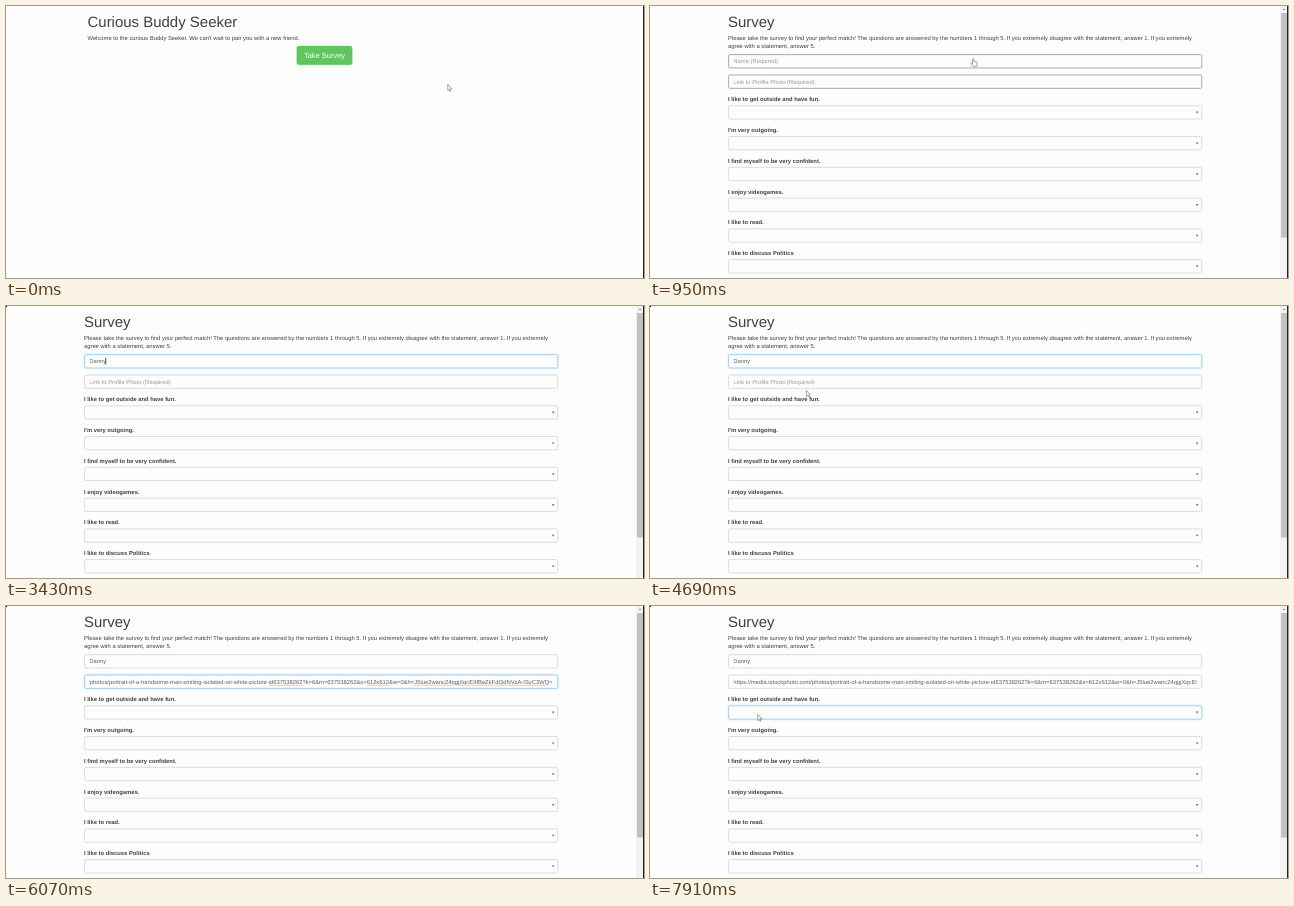
An HTML page for the animation above (8000 ms loop, 638 px wide and 272 px high).

```html
<!DOCTYPE html>
<html lang="en">
<head>
<meta charset="utf-8">
<title>Survey</title>
<style>
html, body { margin: 0; width: 100%; height: 100%; overflow: hidden; background: #fdfdfd; }
#view { position: absolute; left: 0; top: 0; width: 1532px; height: 656px; overflow: hidden;
  transform: scale(.4158); transform-origin: 0 0; text-rendering: geometricPrecision;
  font: 14px/20px Arial, "Liberation Sans", sans-serif; color: #404040; }
.page { position: absolute; top: -3.2px; width: 1140px; }
#home { left: 196px; }
#survey { left: 187.5px; }
h1 { font-size: 36px; font-weight: 500; line-height: 39.6px; margin: 21px 0 9px; }
p { margin: 0 0 10px; }
#btn { width: max-content; margin: 0 auto; padding: 10px 16px; border: 1px solid #5cbc5c; border-radius: 6px;
  font-size: 18px; line-height: 24px; color: #fff; background: #5fc65f; }
#btn.hover { background: #47a947; border-color: #398439; }
.label { font-weight: 700; margin-bottom: 5px; }
.field { position: relative; box-sizing: border-box; height: 34px; margin-bottom: 15px; padding: 5px 11px;
  border: 2px solid #d6d6d6; border-radius: 4px; background: #fdfdfd; color: #606060; }
.field.dark { border-color: #999; }
.field.focus { border-color: #94cbea; box-shadow: 0 0 6px rgba(102, 175, 233, .3); }
.clip { display: flex; height: 20px; overflow: hidden; white-space: nowrap; }
.clip.end { justify-content: flex-end; }
.clip > span { position: relative; flex: none; }
.hint { color: #999; }
.caret::after { content: ""; position: absolute; right: 0; top: 1px; width: 2px; height: 17px; background: #333; }
.hint.caret::after { right: auto; left: 0; }
.marked b { text-decoration: underline wavy #e55 1px; }
b.word { font-weight: 400; }
.select::after { content: ""; position: absolute; right: 7px; top: 13px;
  border: 3px solid transparent; border-top: 5px solid #666; border-bottom: 0; }
svg { position: absolute; left: 0; top: 0; }
</style>
</head>
<body>
<div id="view">
  <div class="page" id="home">
    <h1>Curious Buddy Seeker</h1>
    <p>Welcome to the curious Buddy Seeker. We can't wait to pair you with a new friend.</p>
    <div id="btn">Take Survey</div>
  </div>
  <div class="page" id="survey">
    <h1>Survey</h1>
    <p>Please take the survey to find your perfect match! The questions are answered by the numbers 1 through 5. If you extremely disagree with the statement, answer 1. If you extremely agree with a statement, answer 5.</p>
    <div class="field" id="name"><div class="clip"><span></span></div></div>
    <div class="field" id="link"><div class="clip"><span></span></div></div>
  </div>
</div>
<svg width="638" height="272" viewBox="0 0 638 272">
  <g id="bar">
    <path d="M630 0h7v272h-7z" fill="#f3f3f3"/>
    <path d="M631 7h6v224.5h-6z" fill="#c1c1c1"/>
    <path d="M632.500 4l1.500-1.500 1.500 1.500z" fill="#888"/>
  </g>
  <path d="M637 0h1v272h-1z" fill="#222"/>
  <path id="dot" d="M0 0h1v1H0z"/>
  <g id="cursor" stroke-width=".6" stroke="#666" fill="#fff">
    <path id="arrow" d="M.3.3v6.2l1.400-1.200.9 2 .9-.4-.9-2h1.700z"/>
    <path id="hand" d="M2 5V1q.7-.9 1.4 0v2.4l2.6.6q.8.3.7 1.2L6.2 8.300H2.600L.3 5.300q.6-.9 1.700.3z"/>
    <path id="beam" d="M-1-3.500h2M0-3.500v7M-1 3.500h2"/>
    <circle id="ring" r="4.600" fill="none" stroke="#ea8a9c" stroke-width="1"/>
  </g>
</svg>
<script>
const LOOP = 8000;
const PERSON = "Danny";
const URL_HTML = "https://media.istockphoto.com/photos/portrait-of-a-handsome-man-smiling-isolated-on-white-picture-" +
  "<b class=word>id637538262</b>?k=6&amp;m=637538262&amp;s=<b class=word>612x612</b>&amp;w=0&amp;h=" +
  "<b class=word>J5lue2wanc24qgjXqcEIIfBeZkFdt3dNVzA-ISyC3WQ</b>=";
const KEYS = [2690, 3020, 3150, 3300, 3430];
// time, shape, x, y
const CURSOR = [
  [0, "arrow", 441.5, 78], [100, "arrow", 405, 75], [170, "arrow", 366.5, 70],
  [310, "arrow", 345, 62], [430, "hand", 330, 38], [560, "hand", 320.5, 52],
  [1160, "beam", 262, 58], [1290, "beam", 204, 58], [2130, "ring", 204.5, 58.5], [2280, ""],
  [4690, "arrow", 156, 84], [4870, "ring", 157, 78], [5000, ""],
  [6600, "arrow", 132, 92], [6720, "arrow", 110, 115], [6860, "arrow", 107.5, 108],
  [7770, "ring", 108, 118], [7910, "arrow", 107.5, 108]
];
const $ = id => document.getElementById(id);
const show = (id, on) => $(id).style.display = on ? "" : "none";

for (const q of ["I like to get outside and have fun.", "I'm very outgoing.", "I find myself to be very confident.",
  "I enjoy videogames.", "I like to read.", "I like to discuss Politics"])
  $("survey").insertAdjacentHTML("beforeend", `<div class="label">${q}</div><div class="field select"></div>`);
const firstSelect = document.querySelector(".select");

function setField(id, html, hint, { focus, dark, caret, end, marked }) {
  const box = $(id), clip = box.firstChild, text = clip.firstChild;
  box.classList.toggle("focus", focus);
  box.classList.toggle("dark", dark);
  clip.classList.toggle("end", !!end);
  text.className = (html ? "" : "hint ") + (caret ? "caret " : "") + (marked ? "marked" : "");
  const next = html || hint;
  if (text.shown !== next) text.innerHTML = text.shown = next;
}

function draw(t) {
  const within = (a, b) => t >= a && t < b;
  const inSurvey = t >= 820, dark = t < 1160;
  show("home", !inSurvey);
  show("survey", inSurvey);
  show("bar", inSurvey);
  show("dot", t >= 1440);
  $("btn").classList.toggle("hover", t >= 430);

  setField("name", PERSON.slice(0, KEYS.filter(k => k <= t).length), "Name (Required)", {
    dark, focus: within(2130, 4870), caret: within(2130, 2280) || within(2690, 4100)
  });
  setField("link", t < 5380 ? "" : URL_HTML, "Link to Profile Photo (Required)", {
    dark, focus: within(4870, 7910), end: within(5380, 7770), marked: within(5680, 7770),
    caret: within(5380, 6070) || within(6600, 7010) || within(7240, 7770)
  });
  firstSelect.classList.toggle("focus", t >= 7910);

  const [, shape, x = 0, y = 0] = CURSOR.findLast(c => c[0] <= t);
  for (const s of ["arrow", "hand", "beam", "ring"]) show(s, s === shape);
  $("cursor").setAttribute("transform", `translate(${x} ${y})`);
}

function tick() {
  draw(performance.now() % LOOP);
  requestAnimationFrame(tick);
}
tick();
</script>
</body>
</html>
```
